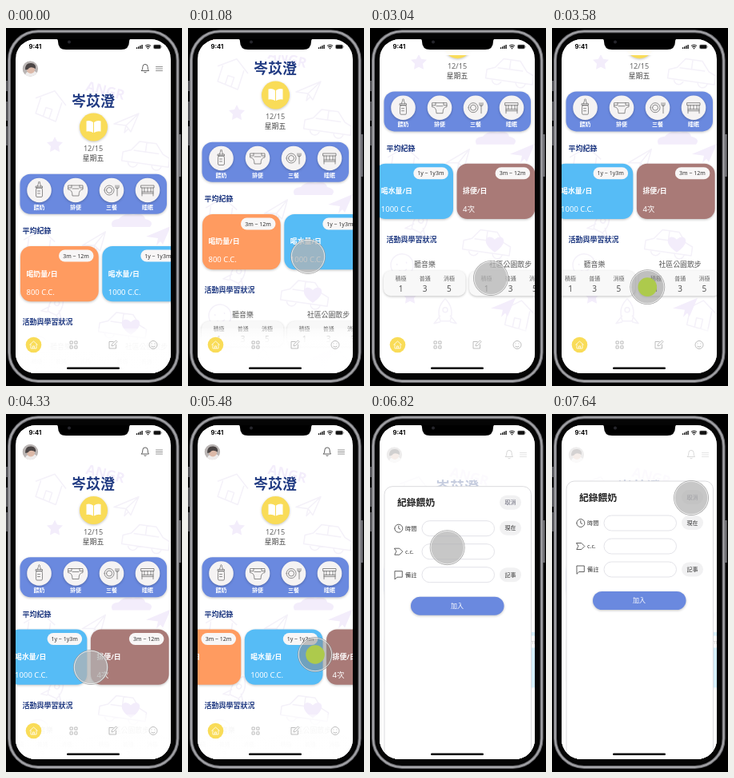
These frames come from a looping animation (220 by 448 pixels, 8 s). An HTML page:

```html
<!DOCTYPE html>
<html lang="zh-Hant">
<head>
<meta charset="utf-8">
<title>Baby log</title>
<style>
html, body { margin: 0; width: 100%; height: 100%; overflow: hidden; background: #000; }
svg { display: block; width: 100vw; height: 100vh; }
text { font-family: "Noto Sans", "Noto Sans CJK TC", "Noto Sans CJK SC", "Noto Sans CJK JP", "Noto Sans CJK", sans-serif; }
.soft { filter: drop-shadow(0 1.5px 1.5px rgba(0,0,0,.24)); }
.line { fill: none; stroke: #3c3c3c; stroke-width: .8; stroke-linecap: round; stroke-linejoin: round; }
.fine { fill: none; stroke: #555; stroke-width: .65; stroke-linecap: round; stroke-linejoin: round; }
.tab { fill: none; stroke: #a8a8a8; stroke-width: .75; stroke-linejoin: round; }
.doodle { fill: none; stroke: #f4f1f9; stroke-width: 1.5; stroke-linejoin: round; }
.tint { fill: #f3edfb; }
</style>
</head>
<body>
<svg viewBox="0 0 220 448">
  <defs>
    <clipPath id="screen"><rect x="12" y="14" width="194" height="418" rx="25"/></clipPath>
    <linearGradient id="fade" x1="0" y1="0" x2="0" y2="1">
      <stop offset="0" stop-color="#fff" stop-opacity=".4"/>
      <stop offset=".25" stop-color="#fff" stop-opacity=".94"/>
      <stop offset="1" stop-color="#fff"/>
    </linearGradient>
  </defs>
  <rect width="220" height="448"/>
  <rect x="216" y="133" width="2.6" height="53" fill="#77777b"/>
  <path d="M1 66v13M1 92v24M1 123v24" stroke="#55555a" stroke-width="2"/>
  <rect x="4" y="4.2" width="210.600" height="437.800" rx="36" fill="#050505" stroke="#6c6c70" stroke-width="4"/>
  <rect x="4" y="4.2" width="210.600" height="437.800" rx="36" fill="none" stroke="#a6a6aa" stroke-width="1.8"/>

  <g clip-path="url(#screen)">
    <rect x="12" y="14" width="194" height="418" fill="#fff"/>
    <g id="page"></g>
    <rect x="12" y="14" width="194" height="20" fill="#fff" opacity=".95"/>
    <rect x="12" y="376" width="194" height="56" fill="url(#fade)"/>
    <g id="tabs"></g>
    <rect id="veil" x="12" y="34" width="194" height="398" fill="#fff"/>
    <g id="modal"></g>
    <rect x="76" y="424.5" width="66" height="2.4" rx="1.2"/>
    <path d="M61 13q4 0 4 4q0 10 10 10h69q10 0 10-10q0-4 4-4z"/>
    <circle cx="79" cy="17.500" r="2" fill="#26262c"/>
    <text x="28.5" y="25.5" font-size="7.7" font-weight="700" style="font-family:Inter,sans-serif">9:41</text>
    <path d="M163.5 26v-1.7M165.7 26v-2.7M167.9 26v-4M170.1 26v-5" stroke="#111" stroke-width="1.4"/>
    <path d="M174 22.4q3.5-2.8 7 0M175.3 24q2.2-1.7 4.4 0" fill="none" stroke="#111" stroke-width="1.1"/>
    <circle cx="177.5" cy="25.6" r=".8"/>
    <rect x="184.5" y="21" width="9" height="5" rx="1.4" fill="#111" stroke="#999" stroke-width=".6"/>
    <path d="M194.6 22.7v1.6" stroke="#999" stroke-width=".8"/>
  </g>

  <g id="cursor">
    <circle id="touch" r="21.5" stroke="#8e8e8e" stroke-width=".7"/>
    <circle r="20.7" fill="none" stroke="#fff" stroke-width=".9" opacity=".8"/>
    <circle id="press" r="11.8" fill="#adca4c"/>
  </g>
</svg>

<script>
const $ = id => document.getElementById(id);
const NAVY = '#203a82', BLUE = '#6a89df';

const text = (x, y, size, value, { fill = '#333', weight = 400, anchor = 'start' } = {}) =>
  `<text x="${x}" y="${y}" font-size="${size}" fill="${fill}" font-weight="${weight}" text-anchor="${anchor}">${value}</text>`;
const centered = (x, y, size, value, style) => text(x, y, size, value, { ...style, anchor: 'middle' });
const box = (x, y, w, h, r, fill, extra = '') =>
  `<rect x="${x}" y="${y}" width="${w}" height="${h}" rx="${r}" fill="${fill}" ${extra}/>`;
const disc = (x, y, r, fill, extra = '') => `<circle cx="${x}" cy="${y}" r="${r}" fill="${fill}" ${extra}/>`;
const at = (x, y, body, extra = '') => `<g transform="translate(${x} ${y}) ${extra}">${body}</g>`;
const path = (d, cls = 'line') => `<path class="${cls}" d="${d}"/>`;

// Faint background doodles
const plane = 'M-15 2L16-11 6 12 0 4zM0 4L16-11M0 4l-2 9 5-5';
const heart = 'M0 10C-20-3-9-15 0-6C9-15 20-3 0 10z';
const cloud = 'M-24 6q-4-9 8-10 6-8 18-5 14-3 15 5 12 3 6 10z';
const car = 'M-28 12v-11l10-4 9-12h21l10 12 9 4v11zM-15-3h32M0-15v12M-20 12a6 6 0 0 0 12 0M10 12a6 6 0 0 0 12 0';
const house = 'M-20 0L0-16 19-3M-14-3v21l27 2V-5M-4 18v-11h8v12';
const kid = 'M-14 0a14 14 0 1 1 28 0a14 14 0 1 1-28 0M-6-3v2M6-3v2M-5 6q5 4 10 0M-12 9l-8 20h38l-7-20';
const rocket = 'M0-18q12 12 6 28h-12q-6-16 6-28M-6 3l-8 10 8-2M6 3l8 10-8-2M-3-4a3 3 0 1 0 6 0a3 3 0 1 0-6 0';
const star = 'M0-9l3 6 7 1-5 5 1 7-6-3-6 3 1-7-5-5 7-1z';
const doodles = [
  [house, 56, 94, 18], [car, 174, 158, 8], [plane, 150, 118, 0],
  [rocket, 62, 348, 25], [house, 42, 268, 8], [plane, 110, 268, -8],
  [car, 145, 372, 8], [kid, 40, 400, -10], [rocket, 94, 460, 0], [house, 186, 460, 12]
].map(([d, x, y, a]) => at(x, y, path(d, 'doodle'), `rotate(${a})`)).join('') + [
  [star, 61, 145], [cloud, 157, 243], [plane, 190, 259], [heart, 156, 374], [plane, 166, 452], [star, 50, 438]
].map(([d, x, y]) => at(x, y, path(d, 'tint'))).join('') +
  `<text transform="translate(99 78) rotate(14)" font-size="17" font-weight="700" class="tint">ANGR</text>`;

const header = `<clipPath id="face"><circle cx="30.3" cy="51" r="9.8"/></clipPath>
  <g clip-path="url(#face)">${disc(30.5, 51, 10, '#bab5b4')}${disc(32, 62, 9, '#eeecec')}
  ${disc(31, 52, 5, '#dcb9a8')}<path d="M24 52q0-9 8-8 6 1 5 7-5-3-8-1-2 3-5 2z" fill="#4b4545"/></g>` +
  at(174, 50.5, path('M-4.5 3h9q-1.4-1.2-1.4-5a3.1 3.1 0 0 0-6.2 0q0 3.8-1.4 5M-1.2 5q1.2 1 2.4 0')) +
  path('M187.500 48.500h8M187.500 51h8M187.500 53.500h8', 'fine');

const bottle = path('M-3-3h6q1 1 1 3v7q0 1.500-1.500 1.500h-5q-1.500 0-1.500-1.500v-7q0-2 1-3zM-4-5h8v2h-8zM-2-5q0-2 1-3 0-3 1-3t1 3q1 1 1 3M-2 1h3M-2 4h3', 'fine');
const diaper = path('M-9-6h18v5q-5 0-5 8h-8q0-8-5-8zM-9-3h4v-3M9-3h-4v-3M-4-2h8', 'fine');
const meal = path('M-9 0a6 6 0 1 1 12 0a6 6 0 1 1-12 0M-6.500 0a3.500 3.500 0 1 1 7 0a3.500 3.500 0 1 1-7 0M7 7V-6M5-6v3q2 2 4 0v-3', 'fine');
const bed = path('M-8-6H8v3H-8zM-7-3v10M7-3v10M-7 2H7M-7 4H7M-4-3v5M0-3v5M4-3v5', 'fine');
const shortcuts = box(17.5, 182.700, 183.5, 50, 13, BLUE, 'class="soft"') +
  [[41.5, '餵奶', bottle], [87, '排便', diaper], [132, '三餐', meal], [177, '睡眠', bed]].map(([x, label, icon]) =>
    disc(x, 203, 15.3, '#f5f3f3', 'class="soft"') + at(x, 203, icon) +
    centered(x, 226.8, 7, label, { fill: '#fff', weight: 700 })).join('');

const statCard = ([label, value, range, color], i) => at(18 + i * 102.3, 273,
  box(0, 0, 97.7, 69.3, 13, color, 'class="soft"') + box(48, 4.5, 43.5, 15, 7.5, '#f8f6f6') +
  centered(69.5, 14.6, 7, range) +
  text(7.5, 37.5, 8.9, label, { fill: '#fff', weight: 700 }) +
  text(7.5, 60.5, 9.5, value, { fill: '#fff', weight: 500 }));
const stats = [
  ['喝奶量/日', '800 C.C.', '3m ~ 12m', '#ff9b60'],
  ['喝水量/日', '1000 C.C.', '1y ~ 1y3m', '#56bcf6'],
  ['排便/日', '4次', '3m ~ 12m', '#a97a77']
].map(statCard).join('');

const activities = ['聽音樂', '社區公園散步'].map((title, i) => at(17 + i * 107, 394,
  centered(51.5, 8.2, 8.9, title, { fill: '#555', weight: 500 }) +
  box(0, 13, 102.5, 31.5, 9, '#f8f8f8', 'class="soft"') +
  [['積極', 1], ['普通', 3], ['消極', 5]].map(([name, n], k) =>
    centered(21.5 + 30.2 * k, 25.5, 7, name, { fill: '#666' }) +
    centered(21.5 + 30.2 * k, 39.5, 10, n, { fill: '#555' })).join(''))).join('');

$('page').innerHTML = doodles + header +
  centered(109, 97.5, 18, '岑苡澄', { fill: NAVY, weight: 700 }) +
  disc(109.5, 124, 17.5, '#f9dc58', 'class="soft"') +
  `<path d="M109 118q-4-3-8.500-1.500v13q4.500-1 8.500 1.500zM110 118q4-3 8.500-1.500v13q-4.500-1-8.500 1.500z" fill="#fff"/>` +
  centered(109, 154, 9.1, '12/15', { fill: '#666' }) +
  centered(109, 166, 8.8, '星期五', { fill: '#444', weight: 500 }) +
  shortcuts + text(20.5, 257.3, 9, '平均紀錄', { fill: NAVY, weight: 700 }) +
  `<g id="stats">${stats}</g>` + text(20.5, 371.3, 9, '活動與學習狀況', { fill: NAVY, weight: 700 }) +
  `<g id="activities">${activities}</g>`;

$('tabs').innerHTML = disc(34.5, 396.5, 9.8, '#f9dc58') +
  `<path d="M29.500 396.500l5-4.500 5 4.500M31 395.500v5.500h7v-5.500M33.500 401v-3h2v3" fill="none" stroke="#fff" stroke-width=".8"/>` +
  at(84.5, 396.5, path('M-4.500-1.300h3.200v-3.200M-4.500-4.500h3.200M-4.500-4.500v3.200M1.300-4.500h3.200v3.200h-3.200zM-4.500 1.300h3.200v3.200h-3.200zM1.300 1.300h3.200v3.200h-3.200z', 'tab')) +
  at(133.5, 396.5, path('M1-4h-5.500v8.500h8.500v-5M-1.500 1.500l.5-2.500 5-4.500 1.500 1.500-4.500 5z', 'tab')) +
  at(184, 396.5, path('M-5 0a5 5 0 1 1 10 0a5 5 0 1 1-10 0M-2-2v1M2-2v1M-2.500 1.500q2.500 2.500 5 0', 'tab'));

const pill = (y, label, color = '#333') => box(162, y - 9, 27, 18, 9, '#f1f1f2') + centered(175.5, y + 2.6, 7, label, { fill: color });
const field = (y, label, icon) => at(35.8, y, icon) + text(44, y + 2.6, 7.2, label, { weight: 500 }) +
  box(65, y - 9.5, 90.5, 19, 9.5, '#fff', 'stroke="#dcdce3" stroke-width=".8"');
$('modal').innerHTML = box(18, 84, 183.5, 370, 10, '#fff', 'stroke="#d2d2d6" stroke-width=".8"') +
  text(34, 108.5, 11.8, '紀錄餵奶', { fill: '#222', weight: 700 }) + pill(104, '取消', '#667') +
  field(136.5, '時間', path('M-5 0a5 5 0 1 1 10 0a5 5 0 1 1-10 0M0-3v3l2 1')) + pill(136, '現在') +
  field(165.5, 'c.c.', path('M-5-4h6l4 4-4 4h-6l2-4z')) +
  field(194.5, '備註', path('M-4.500-4.500h9v7.500h-6.500l-2.500 2.500z')) + pill(194.5, '記事') +
  box(51, 222, 116.5, 23, 11.5, BLUE, 'class="soft"') + centered(109, 236.3, 8, '加入', { fill: '#fff', weight: 500 });

// Keys: [time, value, ...]; each stretch eases in and out.
function track(keys, t) {
  const next = keys.findIndex(k => k[0] > t);
  if (next === 0) return keys[0].slice(1);
  if (next < 0) return keys.at(-1).slice(1);
  const a = keys[next - 1], b = keys[next];
  const p = (t - a[0]) / (b[0] - a[0]), e = p * p * (3 - 2 * p);
  return a.slice(1).map((v, i) => v + (b[i + 1] - v) * e);
}
const scrollKeys = [[260, 0], [540, 40], [1080, 40], [1400, 96], [1830, 96], [1910, 103.3]];
const statKeys = [[2110, 0], [2900, 112], [2930, 112], [3040, 114], [3400, 116.7], [4760, 116.7], [5480, 49.5], [5960, 0]];
const activityKeys = [[3100, 0], [3730, 18], [3830, 18], [4100, 23]];
const cursorKeys = [
  [260, 197, 300], [540, 150, 286], [1080, 150, 286], [1400, 137, 265], [1830, 137, 265], [1910, 135, 261],
  [2110, 135, 261], [2520, 72, 258], [2900, 146, 291], [2930, 146, 291], [3040, 151, 313], [3160, 155, 320],
  [3730, 112, 325], [3830, 112, 325], [4100, 106, 317], [4760, 106, 317], [5480, 159, 301], [5580, 138, 244],
  [6140, 59, 215], [6380, 43, 205], [6550, 43, 205], [7190, 182, 107], [7220, 182, 107], [7640, 174, 105]
];
const drags = [[2150, 2520], [3200, 3650], [4820, 5500]];

function render(t) {
  const open = Math.min(1, Math.max(0, (t - 6440) / 520));
  const rise = 1 - (1 - open) ** 3;
  const scroll = t < 4330 ? track(scrollKeys, t)[0] : t < 6410 ? 3.5 : 0;
  const dragging = drags.some(([a, b]) => t >= a && t < b);
  const move = (id, x, y) => $(id).setAttribute('transform', `translate(${x} ${y})`);
  move('page', 0, -scroll);
  move('stats', -track(statKeys, t)[0], 0);
  move('activities', -track(activityKeys, t)[0], 0);
  move('modal', 0, 350 * (1 - rise));
  move('cursor', ...track(cursorKeys, t));
  $('veil').setAttribute('opacity', .76 * rise);
  $('cursor').setAttribute('visibility', t < 260 ? 'hidden' : 'visible');
  $('touch').setAttribute('fill', dragging ? 'rgba(135,135,135,.5)' : 'rgba(180,180,180,.74)');
  $('press').setAttribute('opacity', dragging ? 1 : 0);
}
function frame() {
  render(performance.now() % 8000);
  requestAnimationFrame(frame);
}
frame();
</script>
</body>
</html>
```
